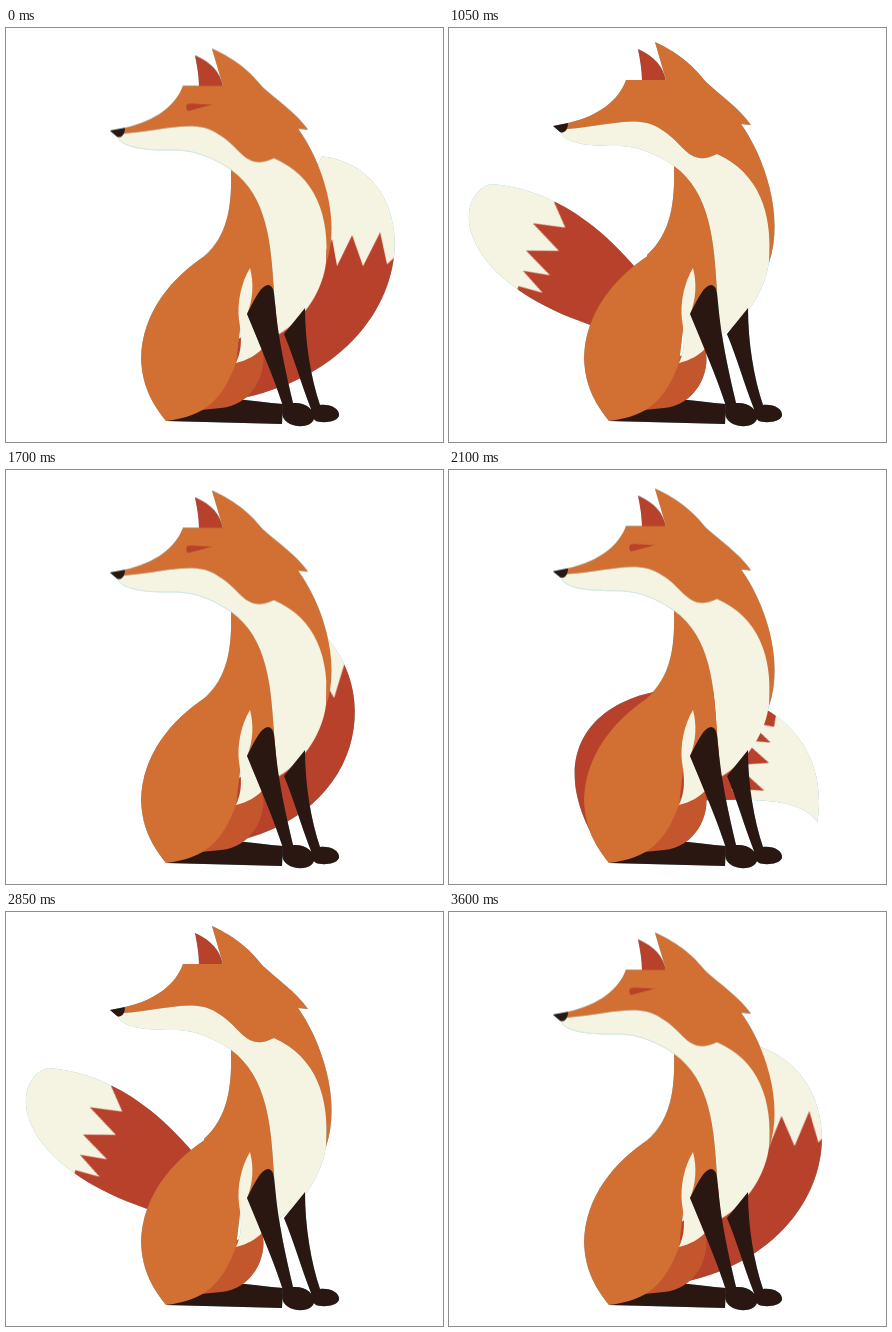
Recreate the animation shown at these times as an HTML page without scripts. Size 437 by 414 pixels, loop 3.65 s.

```html
<!DOCTYPE html>
<html lang="en">
<head>
<meta charset="utf-8">
<title>Fox wagging its tail</title>
<style>
html, body { margin: 0; width: 100%; height: 100%; overflow: hidden; background: #fff; }
svg { display: block; width: 437px; height: 414px; }

.orange { fill: #d26f33; }
.red { fill: #b8412c; }
.cream { fill: #f5f3e2; }
.dark { fill: #2a1712; }
.shade { fill: #c3562d; }
.fox { filter: drop-shadow(0 0 .6px #6fc3cf); }

.brush, .teeth, .upper, .eye { animation: 1825ms linear infinite; }
.brush { animation-name: sweep; }
.teeth { animation-name: turn; }
.upper { animation-name: rise; animation-timing-function: ease-in-out; transform-origin: 0 300px; }
.eye { animation-name: blink; transform-origin: 190px 71px; }

@keyframes rise {
  0%, 95%, 100% { transform: scaleY(.977); }
  40%, 60% { transform: none; }
}
@keyframes blink {
  0%, 49%, 68%, 100% { transform: none; }
  54%, 62% { transform: scaleY(0); }
}

/* Two curves make the tail: base to point, point to base */
@keyframes sweep {
  0%, 100% { d: path("M215 374C420 345 430 140 315 128C290 180 310 280 215 320Z"); }
  7% { d: path("M215 374C370 370 455 260 405 160C330 160 300 270 200 340Z"); }
  15% { d: path("M200 330C260 335 345 318 369 353C400 160 20 180 155 385Z"); }
  30% { d: path("M230 330C190 290 240 240 290 230C195 110 -32 205 160 385Z"); }
  55%, 60% { d: path("M230 300C165 195 100 160 41 156C0 170 5 265 180 308Z"); }
  83.5% { d: path("M215 374C350 360 290 140 103 330C150 290 210 310 215 330Z"); }
  93% { d: path("M215 374C368 350 385 195 285 140C270 200 290 280 215 320Z"); }
}
/* The jagged colour border rides along the tail */
@keyframes turn {
  0%, 100% { transform: translate(351px, 219px) rotate(-90deg); }
  7% { transform: translate(365px, 240px) rotate(-55deg); }
  15% { transform: translate(308px, 295px) rotate(16deg); }
  30% { transform: translate(203px, 230px) rotate(-13deg); }
  55%, 60% { transform: translate(90px, 222px) rotate(-160deg); }
  83.5% { transform: translate(225px, 270px) rotate(-200deg); }
  93% { transform: translate(318px, 210px) rotate(-100deg); }
}
</style>
</head>
<body>
<svg viewBox="0 0 437 414" role="img" aria-label="A sitting fox wags its tail">
  <clipPath id="tail"><path class="brush"/></clipPath>
  <g class="fox">
    <g clip-path="url(#tail)">
      <rect class="cream" width="437" height="414"/>
      <path class="red teeth" d="M-300-300L5-60L7-41L-18-39L8-25L-19-20L12-5L-19 6L15 23L-17 30L2 50L5 80L-300 300Z"/>
    </g>

    <path class="dark" d="M160 393L200 373L224 371C245 372 262 375 277 376L276 396Z"/>
    <path class="shade" d="M175 384L225 330L256 320C263 345 245 378 215 380Z"/>

    <g class="upper">
      <path class="cream" d="M112 105C118 118 150 118 172 118C190 119 208 126 225 138C262 165 265 215 268 262L272 307C300 290 317 260 320 233C324 180 310 145 268 126C240 140 235 115 213 102C190 85 160 98 118 101Z"/>
      <path class="orange" d="M250 90L292 96C315 128 336 188 320 235C324 185 310 145 268 126Z"/>
      <path class="orange" d="M225 138C226 175 222 205 198 227L215 300L241 286L262 270L268 262C265 215 262 165 225 138Z"/>
      <path class="red" d="M189 21C206 29 214 38 217 53H193C193 42 191 31 189 21Z"/>
      <path class="orange" d="M119 95C150 88 170 72 177 52H217L206 14C232 26 246 40 257 54C270 66 290 80 302 97L292 96L298 112L268 126C240 140 235 115 213 102C190 85 160 98 117 101Z"/>
      <path class="dark" d="M104 98L119 95C119 102 115 106 111 104Z"/>
      <path class="red eye" d="M181 71C186 69 197 72 207 71L182 78C180 76 180 73 181 71Z"/>
    </g>

    <path class="orange" d="M200 227C165 250 136 285 135 330C136 360 148 378 160 393C200 388 216 372 230 335L240 250Z"/>
    <path class="cream" d="M244 240C235 255 231 275 233 292C236 310 236 322 230 335C242 332 250 327 256 321L241 286C247 272 248 255 244 240Z"/>
    <path class="dark" d="M278 306L299 280C299 315 305 350 314 377C325 376 334 381 333 388C330 395 315 395 310 393C306 390 304 386 305 381C295 355 288 330 278 306Z"/>
    <path class="dark" d="M241 286C250 268 255 258 262 257C268 258 268 264 269 275C272 310 280 345 287 375C300 374 309 382 308 391C305 400 290 399 284 396C276 392 275 385 277 378C268 350 255 320 241 286Z"/>
  </g>
</svg>
</body>
</html>
```
